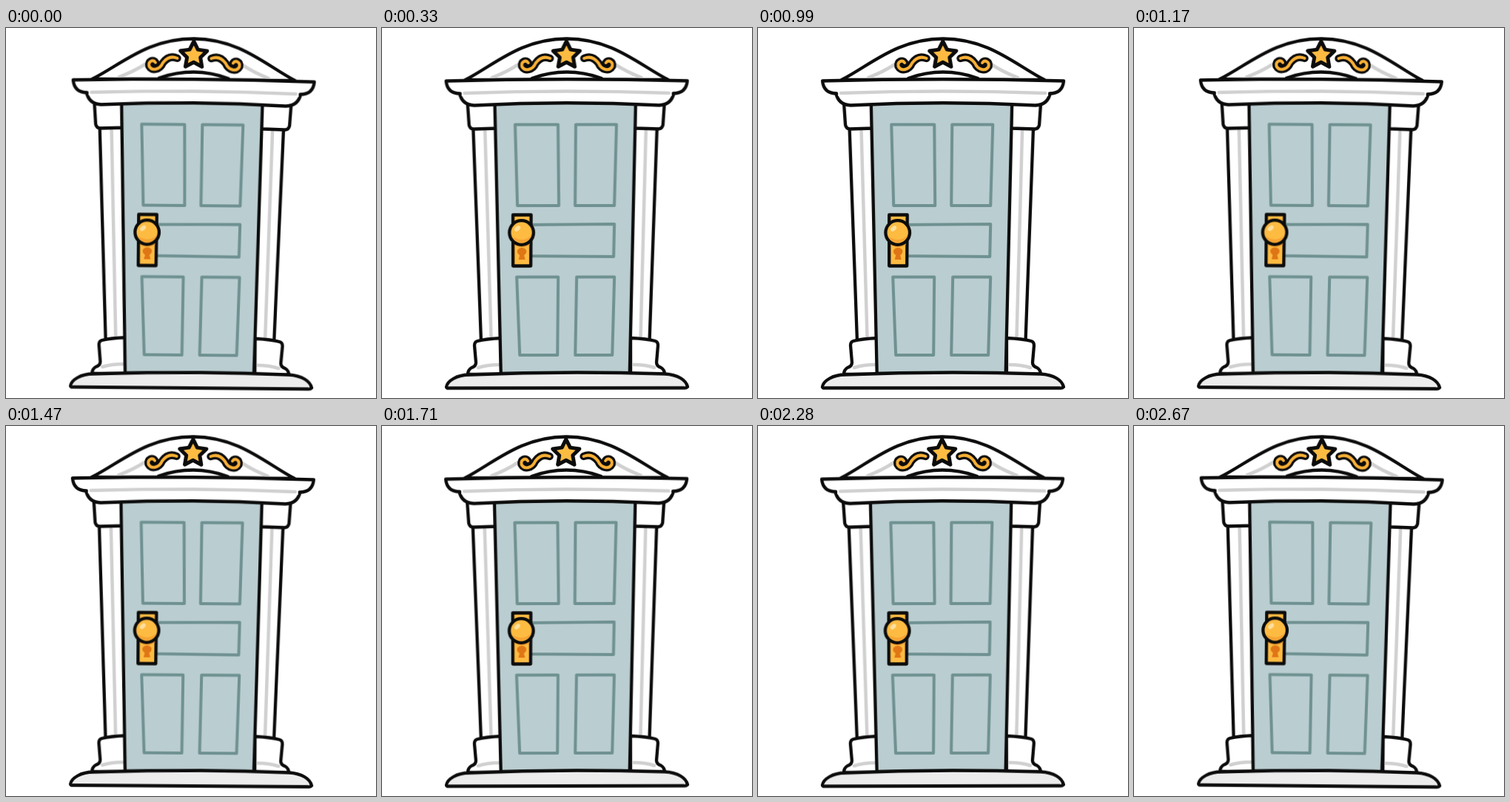
Animation of 500 by 500 pixels, one loop 2.7 s. Source, as an HTML page:

```html
<!DOCTYPE html>
<html lang="en">
<head>
<meta charset="utf-8">
<title>Swaying door</title>
<style>
  html, body { margin: 0; width: 100%; height: 100%; overflow: hidden; background: #fff; }
  svg { display: block; width: 100vw; height: 100vh; }
  .ink { stroke: #0c0c0c; stroke-width: 4.3; }
  .white { fill: #fff; }
  .shade { fill: none; stroke: #d0d0d0; stroke-width: 4.5; }
  .panel { fill: none; stroke: #6f9191; stroke-width: 4; }
  .gold { fill: #fdbb42; }
</style>
</head>
<body>
<svg viewBox="0 0 500 500" stroke-linejoin="round" stroke-linecap="round">
  <defs>
    <filter id="rough" filterUnits="userSpaceOnUse" x="0" y="0" width="500" height="500" color-interpolation-filters="sRGB">
      <feTurbulence type="fractalNoise" baseFrequency=".2" numOctaves="2" seed="4"/>
      <feDisplacementMap in="SourceGraphic" scale="1.3" xChannelSelector="R" yChannelSelector="G"/>
    </filter>
    <g id="blocks" class="ink white">
      <path d="M116 102L118 131Q119 136 124 136.500L156 135.500V102Z"/>
      <path d="M162 419Q140 420 129 423Q125 424 125 429L127 452Q127 457 121 459Q116 462 116 468H162Z"/>
      <path class="shade" d="M130 459Q142 455 158 455"/>
    </g>
    <path id="curl" d="M227.500 41C218 37 212 42 208 47.500C204 57 193 59 189.500 52C188 45 195 42.500 198 47"/>
    <g id="swirl" fill="none">
      <use href="#curl" stroke="#0c0c0c" stroke-width="10.500"/>
      <use href="#curl" stroke="#f9b035" stroke-width="4"/>
    </g>
  </defs>
  <g id="door">
    <g filter="url(#rough)">
      <path class="ink white" d="M123.500 134L134 424H164V134ZM372 134L361.500 424H334V134Z"/>
      <path class="shade" d="M139.500 139L147.500 418M357 139L349.500 418"/>
      <use href="#blocks"/>
      <use href="#blocks" transform="matrix(-1 0 0 1 498 0)"/>

      <g transform="translate(-.8 0)">
        <path class="ink" fill="#bacdd0" d="M153.500 100H344L335.500 467H161.500Z"/>
        <path class="panel" d="M181 130.500H239L240 240H184ZM263 130.500H318L315 240H262ZM188 266L315 265L314 309L189 308ZM183 336.500H239L238 442H187ZM264 336.500H315L312 442H262Z"/>
      </g>

      <path class="ink" fill="#ececed" d="M87 485C88 477 101 468.500 118 468.500Q250 463 382 467.500C400 468.500 411 476 413 485Q411 487 408 486.500H91Q87 487 87 485Z"/>

      <path class="ink white" d="M113 70C152 50 188 14.500 250 14.500S348 50 387 70Z"/>
      <path class="shade" d="M149 67Q168 60 185 49M351 67Q332 60 315 49"/>
      <path class="ink white" d="M203 68Q250 51 297 68"/>
      <path class="ink white" d="M105 87C107 98 114 104 125 104.500Q250 98 375 104.500C386 104 393 98 395 87"/>
      <path class="ink white" d="M106 88.500C94 88.500 88 82 87 71.500Q250 67 413 71.500C412 82 406 88.500 394 88.500"/>
      <path class="white" d="M108 92V85Q250 80 392 85V92Q250 86 108 92Z"/>
      <path class="shade" d="M112 88Q250 83 388 88"/>

      <use href="#swirl"/>
      <use href="#swirl" transform="matrix(-1 0 0 1 501 0)"/>
      <path id="star" class="ink gold" style="stroke-width:5"/>

      <g transform="translate(-.8 0)">
        <path class="ink gold" d="M178 252.500H202.500L202 321.500H178Z"/>
        <path d="M180 287Q190 298 200.500 287V293Q190 300 180 293Z" fill="#f19a2c"/>
        <path d="M187 307C181 303 184 297 190 297S199 303 193 307L194.500 313H185.500Z" fill="#df7616"/>
        <circle class="ink gold" cx="189.500" cy="276.500" r="16.300"/>
        <path d="M177 282A14 14 0 0 0 203 280Q192 291 177 282Z" fill="#f7a331"/>
        <ellipse cx="184" cy="271" rx="4.500" ry="3" transform="rotate(-40 184 271)" fill="#ffdf9c"/>
      </g>
    </g>
  </g>
</svg>
<script>
  const LOOP = 2700, SWAY = LOOP / 2, STEP = 30;
  const door = document.getElementById('door');

  const points = Array.from({ length: 10 }, (_, i) => {
    const angle = i * Math.PI / 5, radius = i % 2 ? 9.5 : 19;
    return [249.7 + radius * Math.sin(angle), 36.8 - radius * Math.cos(angle)];
  });
  document.getElementById('star').setAttribute('d', 'M' + points.join('L') + 'Z');

  // Rock half a degree each way about the doorstep.
  function draw(now) {
    const time = Math.floor(now % LOOP / STEP) * STEP;
    const angle = 0.5 * Math.cos((time + STEP) / SWAY * 2 * Math.PI);
    door.setAttribute('transform', `rotate(${angle} 250 500)`);
    requestAnimationFrame(draw);
  }
  draw(performance.now());
</script>
</body>
</html>
```
